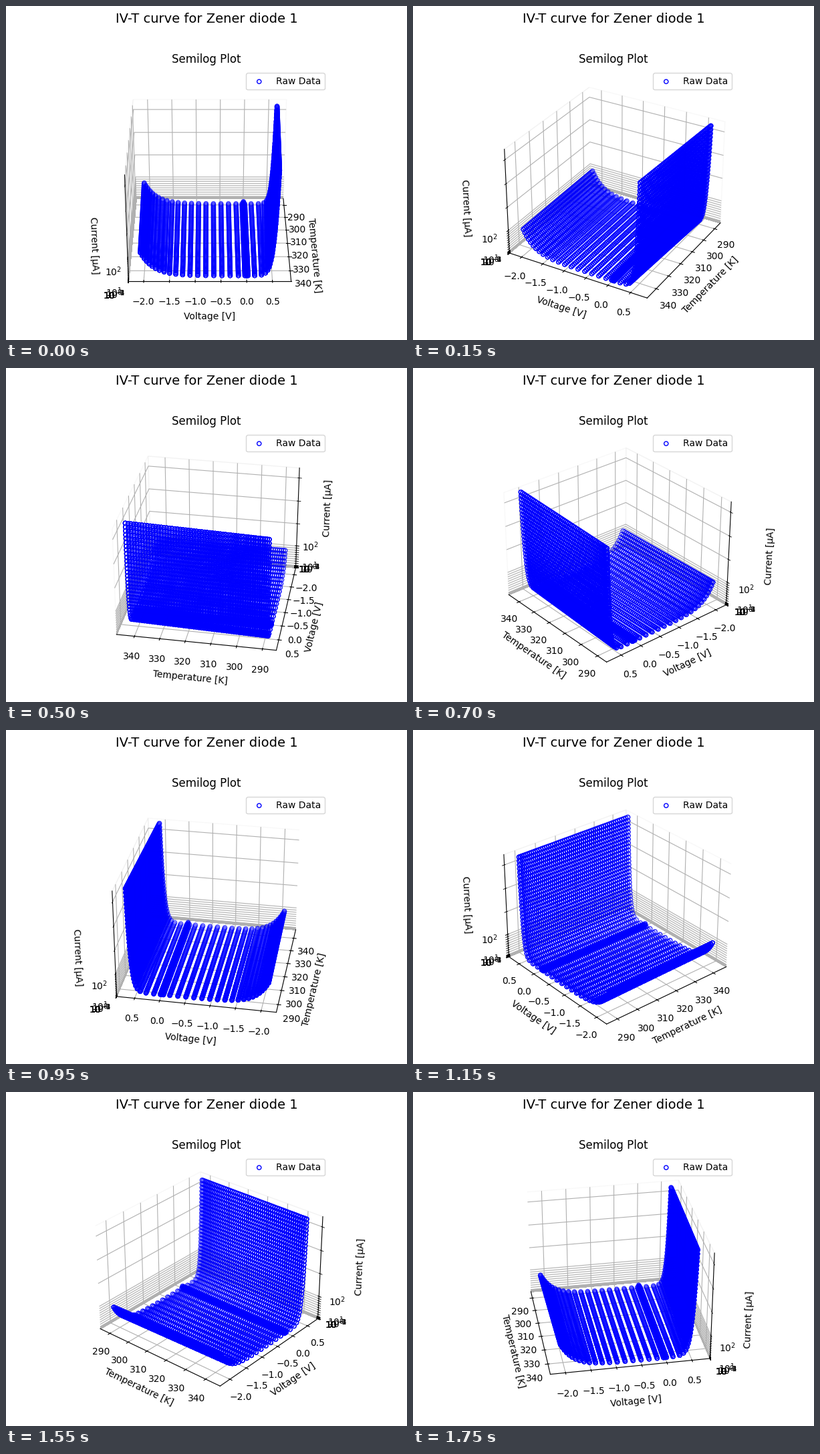
A matplotlib script for the animation above (1800 ms loop, 600 by 500 pixels).

```python
import numpy as np
import matplotlib.pyplot as plt
from matplotlib.animation import FuncAnimation

FRAMES = 36
STEP = 360 / FRAMES
T_MIN, T_MAX = 289.0, 343.4
RESISTOR = 0.01  # volts per microampere
SWEEPS = 3       # repeated readings deepen the shaded markers


def diode_curve(temp, supply):
    """Diode voltage and |current| behind a series resistor."""
    v = np.linspace(-2.5, 0.8, 4000)
    rise = temp - T_MIN
    slope = 2 * 8.617e-5 * temp
    forward = 434 * np.exp((v - 0.66 + 0.0014 * rise) / slope)
    reverse = 94 * np.exp(-(v + 2.1 - 0.001 * rise) / 0.25)
    current = forward - reverse
    volts = np.interp(supply, v + RESISTOR * current, v)
    return volts, np.abs(supply - volts) / RESISTOR


def measure():
    supply = np.linspace(-3.06, 5, 51)
    offset_v = np.array([-0.03, 0.03, 0, 0, 0])
    offset_i = np.array([0.1, 0.1, 3, 6.5, 10])
    rows = []
    for temp in T_MIN + (T_MAX - T_MIN) * np.linspace(0, 1, 56) ** 1.08:
        volts, amps = diode_curve(temp, supply)
        volts = np.append(volts, offset_v)
        amps = np.append(amps, offset_i)
        rows.append((np.full_like(volts, temp), volts, amps))
    return np.tile(np.concatenate(rows, axis=1), SWEEPS)


fig = plt.figure(figsize=(6, 5), dpi=100)
fig.suptitle("IV-T curve for Zener diode 1", fontsize=14)
ax = fig.add_axes([116.5 / 600, 39.7 / 500, 367 / 600, 367 / 500], projection="3d")
ax.set_title("Semilog Plot")

ax.scatter(*measure(), s=20, facecolors="none", edgecolors="b", label="Raw Data")
ax.set_zscale("log")
ax.set_xlim(284.7, 347.1)
ax.set_ylim(-2.296, 0.863)
ax.set_zlim(1e-4, 443)
ax.set_xlabel("Temperature [K]")
ax.set_ylabel("Voltage [V]")
ax.set_zlabel("Current [µA]")
for axis in (ax.xaxis, ax.yaxis, ax.zaxis):
    axis.pane.set_fill(False)
ax.legend(loc="upper right")


def update(i):
    ax.view_init(elev=30, azim=STEP * i)
    return ()


anim = FuncAnimation(fig, update, frames=FRAMES, interval=50, repeat=True)
plt.show()
```
